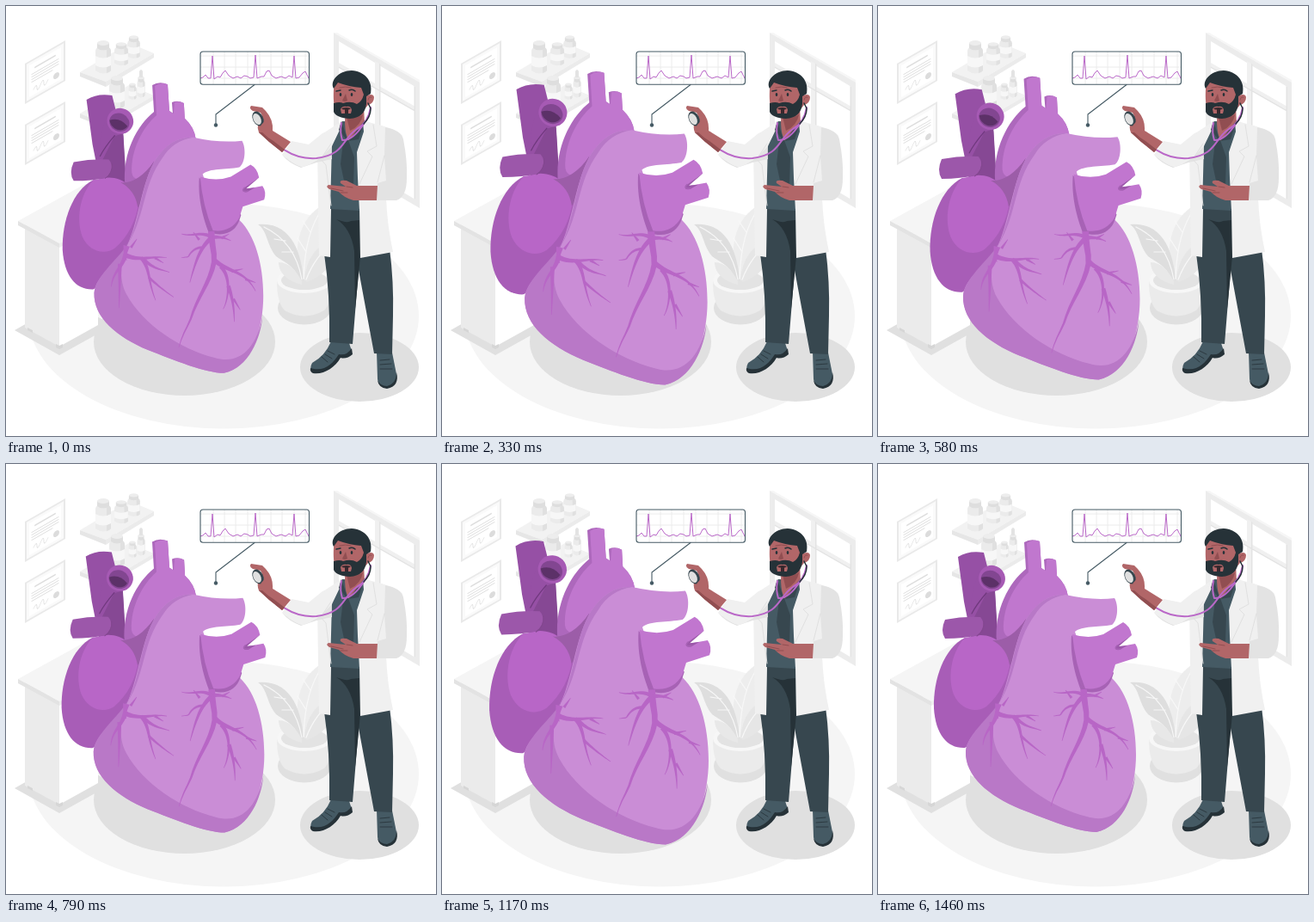
Write an HTML page that moves like this. It is 500 px wide and 500 px high and loops after 1.5 s.

```html
<!DOCTYPE html>
<html lang="en">
<head>
<meta charset="utf-8">
<title>Heart check-up</title>
<style>
html, body { margin: 0; width: 100%; height: 100%; overflow: hidden; background: #fff }
svg { display: block; width: 100%; height: 100% }
.line { fill: none; stroke-linecap: round; stroke-linejoin: round }
</style>
</head>
<body>
<svg viewBox="0 0 500 500">
<defs>
  <g id="certificate" transform="matrix(1 -.574 0 1 0 0)">
    <path fill="#e9e9e9" d="M0 0H47V47H0z"/>
    <path fill="#fafafa" d="M2 2H45V45H2z"/>
    <path fill="#fff" d="M5 5H42V42H5z"/>
    <g class="line" stroke="#dedede">
      <path stroke-width="1.8" d="M12 11H35"/>
      <path d="M8 17H39M8 20H39M8 23H39M8 26H32"/>
      <path stroke-width=".8" d="M10 36q4-6 4 0t4-1 4 0 5-1"/>
    </g>
    <circle cx="36.500" cy="35" r="3.500" fill="#dcdcdc"/>
  </g>
  <g id="jar">
    <path fill="#ebebeb" d="M-9 12Q-9 8-6 7H6Q9 8 9 12V34Q0 41-9 34z"/>
    <path fill="#e0e0e0" d="M4 7H6Q9 8 9 12V34Q7 37 4 37z"/>
    <path fill="#f7f7f7" d="M-9 17Q0 22 9 17V28Q0 33-9 28z"/>
    <path fill="#dedede" d="M-7 2V8Q0 13 7 8V2z"/>
    <ellipse cy="2" rx="7" ry="3" fill="#ededed"/>
  </g>
  <clipPath id="screen"><rect x="226" y="53" width="126" height="38" rx="3"/></clipPath>
</defs>

<ellipse cx="253" cy="360.500" rx="227" ry="131" fill="#f5f5f5"/>

<!-- Wall -->
<use href="#certificate" transform="translate(22 67)"/>
<use href="#certificate" transform="translate(22 138)"/>
<g>
  <path fill="#f2f2f2" d="M86 77L143 43 172 55 116 88z"/>
  <path fill="#e6e6e6" d="M86 77L116 88V94L86 82z"/>
  <path fill="#ebebeb" d="M116 88L172 55V60L116 94z"/>
  <use href="#jar" transform="translate(148.500 35) scale(.8 .69)"/>
  <use href="#jar" transform="translate(134 43) scale(.88 .7)"/>
  <use href="#jar" transform="translate(113 41)"/>
  <path fill="#f2f2f2" d="M86 125L143 92 172 104 116 137z"/>
  <path fill="#e6e6e6" d="M86 125L116 137V142L86 130z"/>
  <path fill="#ebebeb" d="M116 137L172 104V109L116 142z"/>
  <use href="#jar" transform="translate(157 82) scale(.5 .65)"/>
  <path fill="#e3e3e3" d="M155 83V76Q157 72 159 76V83z"/>
  <use href="#jar" transform="translate(147 90) scale(.5)"/>
  <use href="#jar" transform="translate(129 82)"/>
</g>
<g>
  <path fill="#ececec" fill-rule="evenodd" d="M381 31L481 88V235L381 177zM387 41V173L476 225V94z"/>
  <path fill="#f6f6f6" d="M381 31L385 31 481 86V89z"/>
  <path fill="#f0f0f0" d="M429 64L434 67V202L429 199zM387 66L476 117V122L387 71z"/>
  <path fill="#e3e3e3" d="M434 67L435.500 68V203H434zM387 70.500L476 121.500V123L387 72zM476 94V225L474.500 224V93z"/>
</g>

<!-- Cabinet -->
<path fill="#e0e0e0" d="M10 377L70 343 125 371 62 406z"/>
<path fill="#ebebeb" d="M22 252L62 277V396L22 374z"/>
<path fill="#fff" d="M62 277L107 252V371L62 396z"/>
<path fill="#f5f5f5" d="M14 250L92 207 145 233 62 276z"/>
<path fill="#e3e3e3" d="M14 250L62 276V281L14 255z"/>
<path fill="#efefef" d="M62 276L125 242V247L62 281z"/>
<path fill="#d6d6d6" d="M25 374l6 3v3l-6-3zM58 393l4 2 4-2v4l-4 2-4-2z"/>

<!-- Shadows and plant -->
<g fill="#e0e0e0">
  <ellipse cx="207.500" cy="390.500" rx="105.500" ry="62.500"/>
  <ellipse cx="411" cy="420" rx="69" ry="40"/>
  <ellipse cx="347" cy="351" rx="31" ry="19.500"/>
</g>
<path fill="#ebebeb" d="M315 320Q315 345 324 354Q347 367 370 354Q379 345 379 320z"/>
<ellipse cx="347" cy="319" rx="32" ry="15" fill="#f7f7f7"/>
<ellipse cx="347" cy="319" rx="27" ry="11" fill="#e3e3e3"/>
<path fill="#ededed" d="M343 316C333 285 339 246 371 230C377 252 369 295 348 319z"/>
<path fill="#e6e6e6" d="M347 318C350 293 360 278 382 273C386 295 371 314 349 321z"/>
<path fill="#dedede" d="M346 319C344 288 332 250 293 254C304 261 303 278 314 291C323 298 334 300 342 319z"/>
<path fill="#e8e8e8" d="M344 320C336 305 329 299 317 298C317 311 329 321 344 324z"/>
<path class="line" stroke="#f8f8f8" stroke-width="1.200" d="M344 318C339 290 325 269 300 257M312 271L325 273M321 286L334 286M346 317C347 281 354 254 369 234M349 286L339 270M354 263L345 250M349 318Q360 290 379 277"/>

<!-- Monitor -->
<g clip-path="url(#screen)">
  <path fill="#fff" d="M226 53H352V91H226z"/>
  <path class="line" stroke="#e8e8e8" stroke-width=".8" d="M241 53V91M254 53V91M267 53V91M281 53V91M295 53V91M308 53V91M321 53V91M335 53V91M348 53V91M226 58H352M226 71H352M226 84H352"/>
  <path class="line" stroke="#ba68c8" d="M226 84L229 83 232 80 235 84 238 84 240 58 242 85 246 82 249 83 252 78 255 75 259 81 264 84 269 82 273 84 277 81 281 82 284 84 288 83 290 57 292 84 297 82 300 82 303 76 306 75 309 81 314 84 320 82 325 84 329 81 333 83 335 58 337 84 341 83 345 78 348 76 352 84"/>
</g>
<g class="line" stroke="#455a64" stroke-width="1.100">
  <rect x="226" y="53" width="126.500" height="38.300" rx="3"/>
  <path d="M289 91.500L244 126V138"/>
</g>
<circle cx="244" cy="138.500" r="2.200" fill="#455a64"/>

<!-- Doctor -->
<g>
  <path fill="#455a64" d="M378 390L399 392 402 401Q396 409 388 407C382 420 369 428 357 425Q352 422 356 415Q371 407 378 390z"/>
  <path fill="#263238" d="M402 398L403 405Q396 411 389 409C382 421 369 429 357 427Q353 425 354 421C370 426 380 416 387 405Q396 407 402 398z"/>
  <path fill="#455a64" d="M431 402L449 403 454 428Q456 441 443 443Q433 443 432 434z"/>
  <path fill="#263238" d="M454 426Q458 442 443 445Q433 444 432 435Q435 442 443 442Q454 439 454 426z"/>
  <path class="line" stroke="#263238" stroke-width=".8" d="M374 401l8 4M371 405l8 5M367 408l7 6M435 412l11-1M435 417l13-1M435 422l14 0"/>
  <path fill="#37474f" d="M370 288L377 232H412L446 282Q451 320 450 360L449 405 428 404 410 307 403 393 376 391Q377 335 370 288z"/>
  <path fill="#263238" d="M384 248Q397 253 401 250L411 249 412 290 410 312 406 352 405 285Q401 258 384 248z"/>

  <path fill="#f0f0f0" d="M390 134L369 148 362 166 364 290 377 292 378 236H411L412 293 450 286Q443 254 442 222L466 190 461 151Q455 143 425 136L416 133z"/>
  <path fill="#455a64" d="M391 134L379 160 377 236 411 238 409 200 408 170 416 146 415 135z"/>
  <path fill="#37474f" d="M392 158L398 156 405 176 404 207 393 203 389 184z"/>
  <path fill="#e3e3e3" d="M441 141Q459 144 462 155Q467 181 466 200Q466 222 454 226H431L432 206 442 203 440 174z"/>
  <path fill="#f0f0f0" d="M390 140L368 148 352 161 332 157 321 173Q337 186 345 187Q361 184 379 163z"/>
  <path fill="#e3e3e3" d="M321 173Q337 186 345 187Q362 183 378 164L379 178 361 182 343 188Q329 183 321 173z"/>
  <path class="line" stroke="#e0e0e0" d="M378 160L366 178 372 185 378 232M427 138L431 163 420 169 426 175 411 207M440 174L432 205"/>

  <path fill="#b16668" d="M395 120L416 116 417 137 399 157Q392 147 395 120z"/>
  <path fill="#914e51" d="M396 129Q407 132 415 126Q413 139 400 145z"/>
  <path fill="#37474f" d="M390 134L387 144 398 158zM417 133L398 157 410 155z"/>
  <path fill="#b16668" d="M382 88C380 102 380 122 387 126Q404 130 416 121L421 115Q428 113 428 106Q427 101 420 104L416 84Q396 80 382 88z"/>
  <path fill="#263238" d="M381 96C376 87 387 75 402 75C417 76 427 87 424 102L419 105 419 114Q417 130 400 131Q384 130 381 123L381 113Q388 111 392 113Q401 110 408 114Q414 111 416 103L413 95Q399 94 386 89z"/>
  <path fill="#b16668" d="M389 120Q391 116 396 117Q401 116 402 121L401 125H390z"/>
  <path fill="#37282d" d="M390 119Q396 117 401 119L399 120.500H398V125H394V120.500H392z"/>
  <path fill="#914e51" d="M395 102L391 110Q394 112 397 110z"/>
  <ellipse cx="389" cy="103" rx="1.300" ry="2" fill="#263238"/>
  <ellipse cx="402" cy="103" rx="1.300" ry="2" fill="#263238"/>
  <path class="line" stroke="#263238" stroke-width="1.500" d="M384 99l5-1M399 98q4-2 7 1"/>
  <path class="line" stroke="#914e51" d="M388 95q7-2 13 0M421 109q1-4 4-3"/>

  <g class="line" stroke="#ba68c8" stroke-width="2">
    <path d="M297 139C311 162 333 179 361 177C394 173 390 155 408 143Q421 136 424 118"/>
    <path d="M390 136Q388 147 391 156Q403 157 416 137"/>
  </g>
  <path class="line" stroke="#263238" stroke-width="1.500" d="M416 137Q424 129 424 119L421 113"/>
  <path fill="#b16668" d="M331 158L310 145Q311 132 302 122L298 118 285 116Q282 119 287 122L296 124 298 128Q290 137 294 147L306 158 321 170z"/>
  <path fill="#914e51" d="M298 147Q304 153 311 157L324 167 321 170 306 158 294 147z"/>
  <ellipse cx="293" cy="131" rx="6" ry="9" transform="rotate(-27 293 131)" fill="#37474f"/>
  <ellipse cx="292" cy="131.500" rx="4.200" ry="7" transform="rotate(-27 292 131.500)" fill="#e0e0e0"/>
  <path class="line" stroke="#b16668" stroke-width="3" d="M299 122Q305 128 303 134L298 139"/>
  <path fill="#b16668" d="M432 209L408 209 396 203Q387 202 389 206L395 210 375 208Q371 210 376 213L387 216Q393 223 404 226L431 226z"/>
  <path class="line" stroke="#914e51" d="M378 212l14 3M389 217l8 0M396 210l7 1"/>
</g>

<!-- Heart -->
<g id="heart">
  <path fill="#9650a5" d="M93 108Q106 100 123 103L127 119 136 150 139 210H110L100 160z"/>
  <path fill="#864894" d="M112 178L126 150 136 147 140 211 119 205z"/>
  <path fill="#9650a5" d="M119 123Q106 151 109 174L124 151 141 146z"/>
  <path class="line" stroke="#70397e" stroke-width="1.200" d="M109 174Q114 164 126 150"/>
  <ellipse cx="132.500" cy="133" rx="15.500" ry="15" fill="#a65ab4" transform="rotate(25 132.500 133)"/>
  <ellipse cx="131.500" cy="134.500" rx="12" ry="10.500" fill="#824691" transform="rotate(25 131.500 134.500)"/>
  <path fill="#5c3168" d="M120 132Q132 128 141 139Q137 145 129 143Q121 140 120 132z"/>

  <path fill="#a85db7" d="M101 202C77 214 64 250 65 284C67 315 81 331 101 330L148 300 158 230 140 205z"/>
  <path fill="#b866c7" d="M101 202C84 220 81 250 88 268C96 286 114 290 126 282C142 268 152 248 154 228C151 212 137 199 119 199z"/>
  <path fill="#9c57aa" d="M78 181Q99 177 119 178Q127 187 117 199Q100 203 78 203Q72 194 78 181z"/>
  <path class="line" stroke="#83478f" d="M123 183Q124 194 115 200"/>

  <path fill="#ad68bc" d="M138 207C135 170 152 138 172 122L170 91Q178 86 188 90L190 121 194 124 193 111Q200 108 207 112L208 130Q219 140 221 154L176 215 152 220z"/>
  <path fill="#c077ce" d="M146 193C145 167 158 141 175 126L173 92Q180 87 188 90L190 121 195 124 196 111Q202 109 207 112L208 130Q219 140 221 154L181 178Q166 199 153 201Q147 200 146 193z"/>
  <path fill="#9c5da8" d="M133 205C146 206 160 198 172 180L163 222 153 234Q150 214 133 205z"/>

  <path fill="#ca8dd6" d="M218 152Q249 159 275 156C280 164 279 182 272 187C256 190 237 188 229 195L237 219 272 249C290 266 300 300 300 338C300 374 287 421 254 428C232 428 196 413 165 401C129 386 101 363 102 334C104 313 128 301 138 284C155 252 156 207 174 178C186 160 200 151 218 152z"/>
  <path fill="#b978c7" d="M142 274C136 290 104 312 102 334C101 363 129 386 165 401C196 413 232 428 254 428C283 422 297 387 299 362C292 399 272 419 243 410C203 400 159 371 140 336C130 317 133 296 142 274z"/>
  <path fill="#b878c7" d="M218 152C200 151 186 160 174 178C157 204 157 247 141 278C163 242 158 209 182 176Q194 156 218 152z"/>

  <path fill="#a762b5" d="M225 199C223 226 231 250 236 263C256 270 268 261 272 249L274 243 268 235 230 205z"/>
  <path fill="#c176cf" d="M226 198Q245 204 262 198L285 184Q293 188 295 199L277 213 299 209Q304 216 301 225L276 233 272 246C265 259 253 263 241 261Q229 232 226 198z"/>
  <path fill="#9c58aa" d="M295 199L278 211Q273 217 281 216L290 211 280 212z"/>
  <path class="line" stroke="#a762b5" stroke-width="1.500" d="M278 211Q273 216 282 215"/>

  <g id="veins" fill="#b866c6"></g>
</g>
</svg>
<script>
// Root width, then the branches that taper from it.
const veins = [
  [7, "M239 262C240 285 245 290 241 304C234 328 221 342 214 368Q205 383 201 398", "M140 279Q137 293 140 296"],
  [5, "M241 268C227 280 222 292 214 322", "M243 296C258 310 278 307 291 332", "M139 290C156 298 170 290 187 293", "M139 288C135 306 124 308 122 327"],
  [4, "M250 303C264 317 258 345 253 353", "M259 326Q266 345 266 368", "M159 294C172 307 180 306 190 310", "M157 293C168 306 164 318 174 343", "M132 300Q132 323 131 352", "M240 269C226 261 218 269 204 265", "M241 269Q252 268 262 273"],
  [2.5, "M228 281Q218 281 212 292L204 293", "M225 272L218 263", "M251 270L260 265", "M263 309L276 306", "M279 318L291 322", "M265 341L273 354", "M166 316Q180 329 195 339", "M173 293L183 299", "M145 281L152 271"]
];

const SVG = "http://www.w3.org/2000/svg";
const BEAT = 750, RISE = 410, LEAD = 8, DRAWN_SCALE = 1.009;
const heart = document.getElementById("heart");
const veinLayer = document.getElementById("veins");

function taper(d, width, steps = 16) {
  const path = document.createElementNS(SVG, "path");
  path.setAttribute("d", d);
  const length = path.getTotalLength();
  const left = [], right = [];
  for (let i = 0; i <= steps; i++) {
    const at = length * i / steps;
    const p = path.getPointAtLength(at);
    const a = path.getPointAtLength(at - 1), b = path.getPointAtLength(at + 1);
    const angle = Math.atan2(b.y - a.y, b.x - a.x);
    const half = (width * (1 - i / steps) + 0.6) / 2;
    const dx = -Math.sin(angle) * half, dy = Math.cos(angle) * half;
    left.push([p.x + dx, p.y + dy]);
    right.unshift([p.x - dx, p.y - dy]);
  }
  path.setAttribute("d", `M${[...left, ...right].join("L")}z`);
  return path;
}

for (const [width, ...branches] of veins)
  for (const d of branches) veinLayer.append(taper(d, width));

function draw(now) {
  const t = (now + LEAD) % BEAT;
  const swell = t < RISE ? t / RISE : (BEAT - t) / (BEAT - RISE);
  const scale = (1 + 0.1 * swell) / DRAWN_SCALE;
  heart.setAttribute("transform", `translate(182 257) scale(${scale}) translate(-182 -257)`);
}

const start = performance.now();
function tick() {
  draw(performance.now() - start);
  requestAnimationFrame(tick);
}
tick();
</script>
</body>
</html>
```
